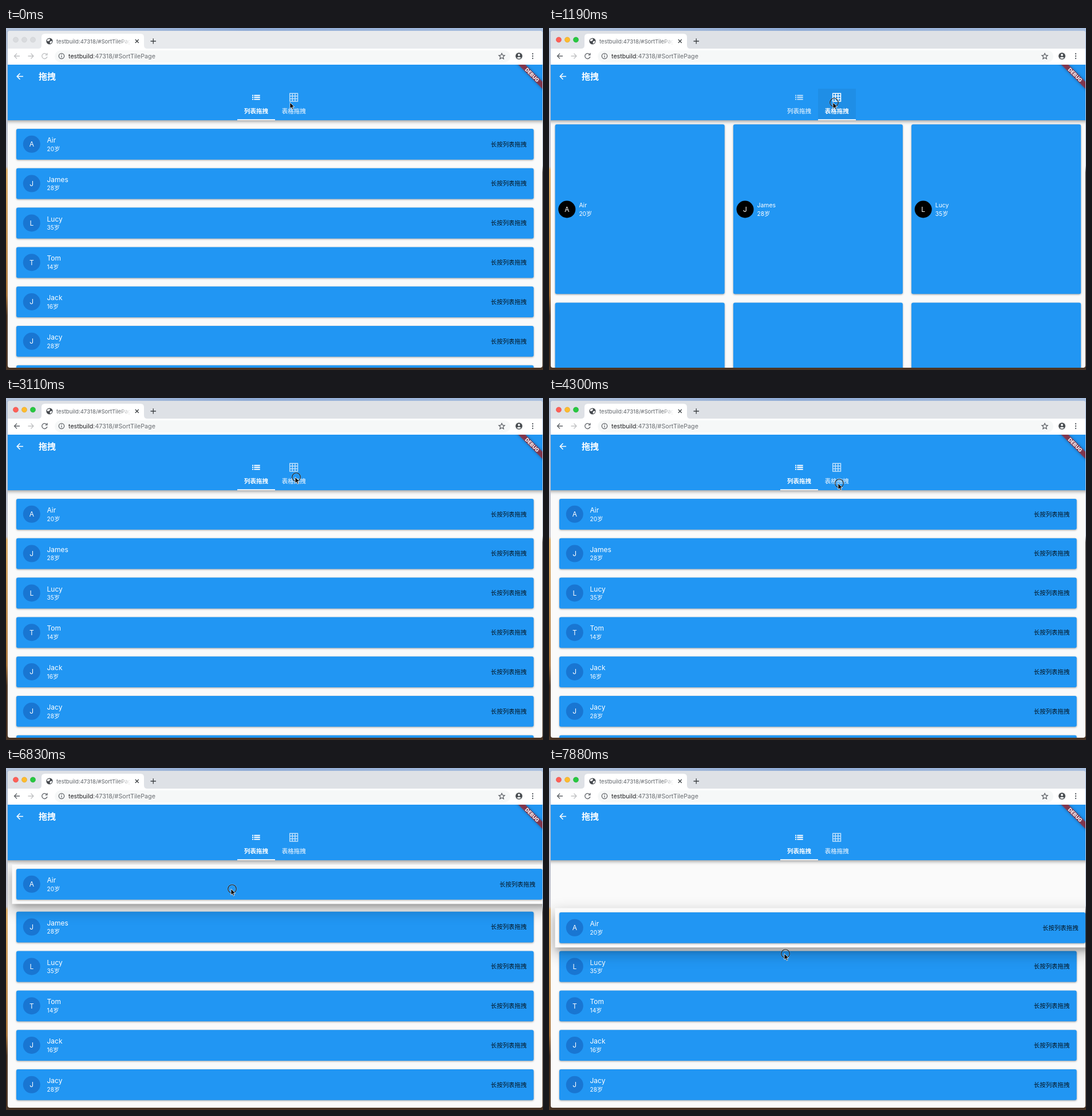
An HTML page for the animation above (8000 ms loop, 938x597 px).

```html
<!DOCTYPE html>
<html lang="zh">
<head>
<meta charset="utf-8">
<title>拖拽</title>
<style>
  html, body { margin: 0; width: 100%; height: 100%; overflow: hidden; }
  svg { display: block; font-family: Inter, "Noto Sans CJK SC", "Noto Sans CJK", sans-serif; }
  .card { fill: #2196f3; filter: drop-shadow(0 1.5px 1.5px rgba(0,0,0,.36)); }
  .bar { fill: #2196f3; filter: drop-shadow(0 2px 3px rgba(0,0,0,.4)); }
  .line { fill: none; stroke: #5f6368; stroke-width: 1.3; }
  .tab { opacity: .7; }
  .tab.on { opacity: 1; }
  .lights, .nav { transition: none; }
  .idle .lights circle { fill: #d9dbde; stroke: #cbcdd0; }
  .idle .nav { opacity: .4; }
  .idle .strip { fill: #e8eaed; }
</style>
</head>
<body>
<svg id="stage" width="938" height="597" viewBox="0 0 938 597">
  <defs>
    <linearGradient id="sky"><stop offset="0" stop-color="#b4c4dc"/><stop offset=".45" stop-color="#8fabd6"/><stop offset="1" stop-color="#a9bfdf"/></linearGradient>
    <linearGradient id="side" x2="0" y2="1">
      <stop offset="0" stop-color="#aebdd4"/><stop offset=".4" stop-color="#c3c3cc"/>
      <stop offset=".41" stop-color="#dcae6c"/><stop offset=".78" stop-color="#a9763f"/>
      <stop offset=".84" stop-color="#4a3526"/><stop offset="1" stop-color="#4a3526"/>
    </linearGradient>
    <linearGradient id="edge" x2="0" y2="1">
      <stop offset="0" stop-color="#a9bfdf"/><stop offset=".4" stop-color="#b3bccb"/>
      <stop offset=".42" stop-color="#33302f"/><stop offset="1" stop-color="#4a3526"/>
    </linearGradient>
    <linearGradient id="fade"><stop offset="0" stop-color="#fff" stop-opacity="0"/><stop offset="1" stop-color="#fff"/></linearGradient>
    <clipPath id="win"><rect x="3" y="5" width="934" height="588" rx="4"/></clipPath>
    <clipPath id="body"><rect x="3" y="161" width="934" height="432"/></clipPath>
    <clipPath id="app"><rect x="3" y="64" width="934" height="529"/></clipPath>
    <clipPath id="title"><rect x="86" y="12" width="131" height="22"/></clipPath>
    <filter id="soft" x="-10%" y="-100%" width="120%" height="300%"><feGaussianBlur stdDeviation="13"/></filter>
    <filter id="tight" x="-10%" y="-50%" width="120%" height="200%"><feGaussianBlur stdDeviation="5"/></filter>
  </defs>

  <rect width="938" height="597" fill="#4a3526"/>
  <rect width="938" height="8" fill="url(#sky)"/>
  <rect y="5" width="6" height="592" fill="url(#side)"/>
  <rect x="932" y="5" width="6" height="588" fill="url(#edge)"/>

  <g clip-path="url(#win)">
    <rect x="3" y="5" width="934" height="588" fill="#fafafa"/>

    <g id="chrome">
      <rect class="strip" x="3" y="5" width="934" height="31" fill="#dee1e6"/>
      <g class="lights" stroke-width=".6">
        <circle cx="17" cy="20.5" r="4.5" fill="#ff5f57" stroke="#e2483f"/>
        <circle cx="32" cy="20.5" r="4.5" fill="#febc2e" stroke="#e0a020"/>
        <circle cx="47" cy="20.5" r="4.5" fill="#28c840" stroke="#1dab32"/>
      </g>
      <path d="M56 36q6 0 6-6V16q0-6 6-6H235q6 0 6 6V30q0 6 6 6z" fill="#fff"/>
      <circle cx="76" cy="23" r="5.6" fill="#45494e"/>
      <path d="M72 20l4-1.5 1 2-2 2.500-3 0zM77 23.500l3-1 .5 2-2.500 3-1.500-1.500z" fill="#fff"/>
      <g clip-path="url(#title)">
        <text x="88" y="26.500" font-size="9.600" fill="#5f6368">testbuild:47318/#SortTilePage</text>
        <rect x="196" y="14" width="22" height="18" fill="url(#fade)"/>
      </g>
      <path class="line" d="M225.800 20l6 6m0-6l-6 6M252.500 23h9.500M257.250 18.250v9.500" style="stroke:#3c4043"/>
      <rect x="3" y="36" width="934" height="28" fill="#fff"/>
      <rect x="85" y="39" width="796" height="21" rx="10.500" fill="#f1f3f4" opacity=".6"/>
      <g class="nav">
        <path class="line" d="M24 49H14.500m4.500-4.500l-4.500 4.500 4.500 4.500"/>
        <path class="line" d="M71 46.200a4.600 4.600 0 1 0 .9 3.800M72 43.800v3.400h-3.500"/>
      </g>
      <path class="line" d="M38.500 49H48m-4.500-4.500l4.500 4.500-4.500 4.500" opacity=".4"/>
      <circle class="line" cx="97" cy="49" r="4.700" stroke-width="1.100"/>
      <path class="line" d="M97 48.500v3M97 46v1.200"/>
      <text x="109" y="53" font-size="10.700" fill="#202124">testbuild<tspan fill="#6a6e73">:47318/#SortTilePage</tspan></text>
      <path class="line" stroke-width="1.100" d="M866 44.200l1.500 3.300 3.600.4-2.700 2.400.8 3.600-3.200-1.900-3.200 1.900.8-3.600-2.700-2.400 3.600-.4z"/>
      <circle cx="896" cy="49" r="6" fill="#4a4e52"/>
      <circle cx="896" cy="47" r="1.900" fill="#fff"/>
      <path d="M892.200 52q3.800-3.200 7.600 0-3.800 3.200-7.600 0z" fill="#fff"/>
      <g fill="#5f6368"><circle cx="920" cy="45" r="1.200"/><circle cx="920" cy="49" r="1.200"/><circle cx="920" cy="53" r="1.200"/></g>
    </g>

    <g clip-path="url(#body)">
      <g id="list"></g>
      <g id="grid"></g>
    </g>

    <g clip-path="url(#app)">
      <rect class="bar" x="-7" y="54" width="954" height="107"/>
      <path d="M30 84.500H19.500m5-5.200l-5.200 5.200 5.200 5.200" fill="none" stroke="#fff" stroke-width="1.600"/>
      <text x="57" y="90" font-size="15" font-weight="600" fill="#fff">拖拽</text>
      <rect id="hover" y="106" width="66" height="55" fill="#000" opacity=".055"/>
      <g class="tab" fill="#fff">
        <path d="M430 116.800h2v2h-2zm0 3.300h2v2h-2zm0 3.300h2v2h-2zM433.300 116.800h10.400v2h-10.400zm0 3.300h10.400v2h-10.400zm0 3.300h10.400v2h-10.400z"/>
        <text x="416" y="149" font-size="10.500" font-weight="600">列表拖拽</text>
      </g>
      <g class="tab" fill="#fff">
        <path d="M495.700 114.200h13.800v13.800h-13.800zM500.300 114.200v13.800m4.600-13.800v13.800M495.700 118.800h13.800m-13.800 4.600h13.800" fill="none" stroke="#fff" stroke-width="1.500"/>
        <text x="481.700" y="149" font-size="10.500" font-weight="600">表格拖拽</text>
      </g>
      <rect id="mark" y="159.300" width="66" height="1.700" fill="#fff"/>
      <g transform="translate(937 64) rotate(45)">
        <rect x="-45" y="20.900" width="90" height="9" fill="#b71c1c" fill-opacity=".66" style="filter:drop-shadow(0 0 2.500px rgba(0,0,0,.5))"/>
        <text y="28.500" font-size="8.800" font-weight="800" fill="#fff" text-anchor="middle">DEBUG</text>
      </g>
    </g>
    <g clip-path="url(#body)"><g id="lift"></g></g>
  </g>

  <g id="cursor">
    <g id="ring" fill="none">
      <circle cx="2" r="7.300" stroke="#fff" stroke-width="2.200" opacity=".35"/>
      <circle cx="2" r="7.300" stroke="#111" stroke-width="1.100"/>
    </g>
    <path d="M0 0V10.600L2.500 8.400 4.100 12.200 6 11.400 4.400 7.700H7.700z" stroke="#fff" stroke-width=".8"/>
  </g>
</svg>
<script>
const $ = id => document.getElementById(id);
const LOOP = 8000, PAGE = 934, PITCH = 68.8;
const people = [['Air', 20], ['James', 28], ['Lucy', 35], ['Tom', 14], ['Jack', 16], ['Jacy', 28], ['Lily', 22]];

const text = (x, y, size, str, more = 'fill="#fff"') =>
  `<text x="${x}" y="${y}" font-size="${size}" ${more}>${str}</text>`;
const avatar = (x, y, name, fill) =>
  `<circle cx="${x}" cy="${y}" r="15" fill="${fill}"/>` +
  text(x, y + 4.4, 12, name[0], 'fill="#fff" text-anchor="middle"');
const box = (x, y, w, h) => `<rect class="card" x="${x}" y="${y}" width="${w}" height="${h}" rx="3"/>`;

const row = ([name, age], w) =>
  box(18, 0, w, 53.8) + avatar(44.8, 26.8, name, '#1976d2') +
  text(71.5, 24, 12, name) + text(71.5, 38.5, 10.2, age + '岁') +
  text(18 + w - 12.3, 30.7, 10.45, '长按列表拖拽', 'fill="#000" fill-opacity=".87" text-anchor="end"');

const tile = (p, i) => {
  const x = 10.7 + i % 3 * 311.2, y = 168.3 + Math.floor(i / 3) * 311.2, mid = y + 148.2;
  return box(x, y, 296, 296) + avatar(x + 20.6, mid, p[0], '#000') +
    text(x + 41.7, mid - 3.4, 10.4, p[0]) + text(x + 41.7, mid + 11.4, 10.2, p[1] + '岁');
};

$('list').innerHTML = people.map((p, i) => `<g transform="translate(0 ${176 + i * PITCH})">${row(p, 903.7)}</g>`).join('');
$('grid').innerHTML = people.slice(0, 6).map(tile).join('');
$('lift').innerHTML =
  '<rect x="6" y="0" width="950" height="72" opacity=".25" filter="url(#soft)"/>' +
  '<rect x="14" y="6" width="940" height="60" opacity=".2" filter="url(#tight)"/>' +
  '<rect x="10.5" y="-7.5" width="934" height="68.800" fill="#fafafa"/>' + row(people[0], 919);

// time, page position, indicator position, pressed tab
const tabs = [[0, 0, 0, -1], [890, .13, .2, 1], [1040, .89, 1, 1], [1190, 1, 1, 1],
  [2080, .87, .8, 0], [2220, .108, 0, 0], [2370, 0, 0, -1]];
// time, pointer tip
const path = [[0, 496, 130], [1630, 462, 131], [1780, 436, 132],
  [2810, 452, 133], [2960, 480, 136], [3110, 505, 138], [3260, 513, 138],
  [3550, 450, 168], [3700, 310, 230], [3850, 242, 252], [4000, 320, 222], [4150, 455, 165], [4300, 505, 149],
  [4590, 488, 168], [4740, 458, 198], [4890, 448, 210],
  [5190, 478, 172], [5340, 514, 135], [5490, 498, 152], [5640, 446, 188], [5780, 404, 212], [5930, 393, 211],
  [7430, 395, 224], [7580, 398, 248], [7730, 405, 286], [7880, 411, 324]];
// time, top of the lifted card
const lifts = [[0, 0], [6830, 176], [7430, 178], [7580, 190], [7730, 217], [7880, 252]];

const at = (rows, t) => rows.filter(r => r[0] <= t).pop();
const move = (id, x, y) => $(id).setAttribute('transform', `translate(${x} ${y})`);
const show = (el, on) => { el.style.display = on ? '' : 'none'; };
const labels = document.querySelectorAll('.tab');

function draw(t) {
  const [, page, mark, pressed] = at(tabs, t);
  const [, x, y] = at(path, t);
  const top = at(lifts, t)[1];

  $('chrome').classList.toggle('idle', t < 150);
  show($('ring'), t >= 150);
  move('cursor', x, y);

  move('list', -page * PAGE, top ? 6 : 0);
  move('grid', (1 - page) * PAGE, 0);
  show($('grid'), page > 0);
  show($('list').firstChild, !top);
  show($('lift'), top);
  move('lift', 0, top);

  $('mark').setAttribute('x', 404 + 66 * mark);
  labels.forEach((el, i) => el.classList.toggle('on', i === Math.round(mark)));
  show($('hover'), pressed >= 0);
  $('hover').setAttribute('x', 404 + 66 * pressed);
}

const start = performance.now();
function tick() {
  draw((performance.now() - start) % LOOP);
  requestAnimationFrame(tick);
}
tick();
</script>
</body>
</html>
```
